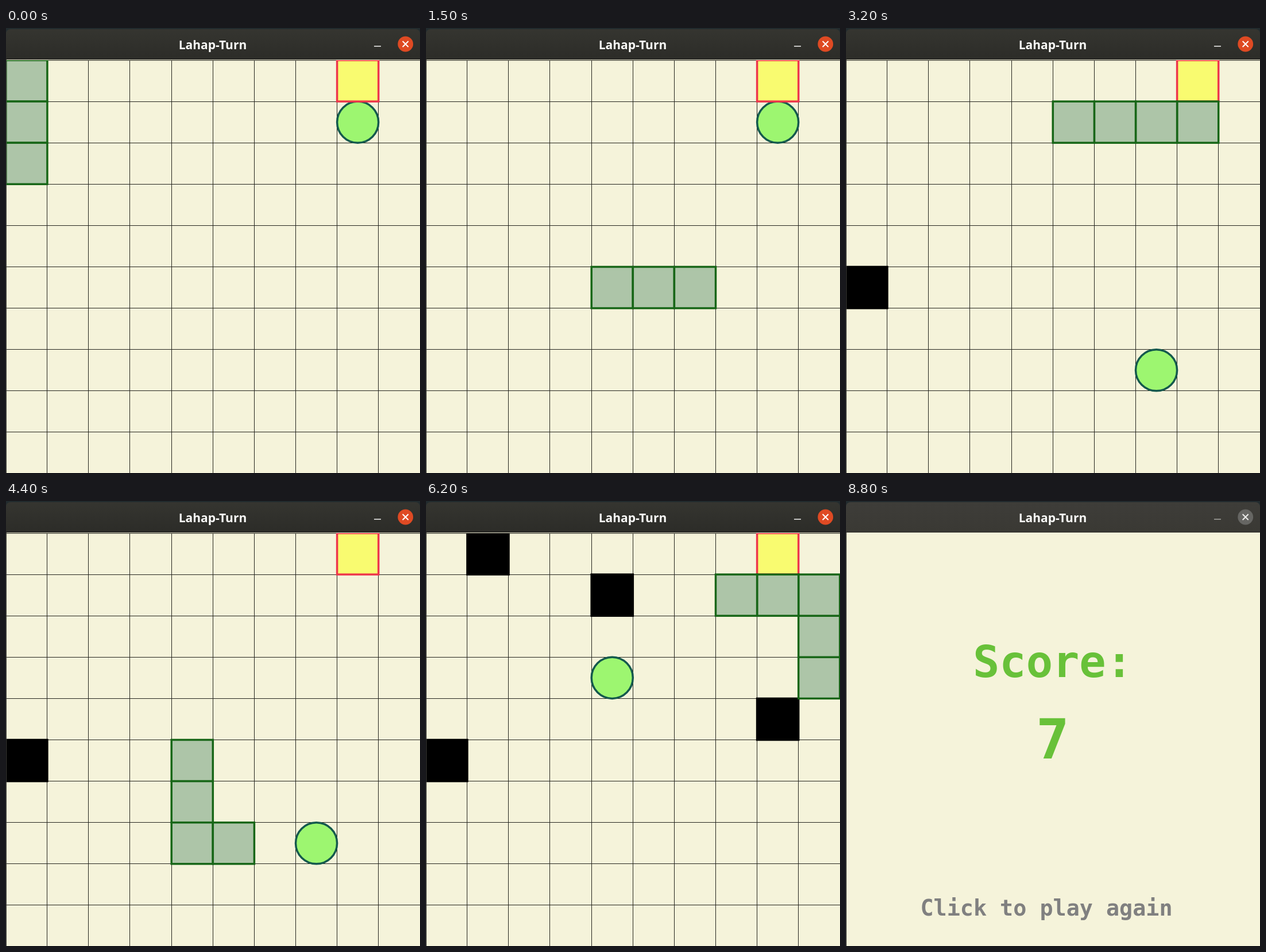
An HTML page with a canvas for the animation above (8900 ms loop, 721 px wide and 776 px high).

```html
<!DOCTYPE html>
<html lang="en">
<head>
<meta charset="utf-8">
<title>Lahap-Turn</title>
<style>
html, body { margin: 0; width: 100%; height: 100%; overflow: hidden; background: #f5f3da; }
canvas { display: block; }
</style>
</head>
<body>
<canvas id="stage" width="721" height="776"></canvas>
<script>
const ctx = document.getElementById('stage').getContext('2d');
const W = 721, H = 776, TOP = 56, CELL = 72.1, EDGE = 3.5;
const LOOP = 8900, GAME_OVER = 6800, BLUR = 8800;
const MONO = '"DejaVu Sans Mono", monospace';

// One letter per move, and the tenth of a second at which it shows.
const MOVES = 'DDDRRRRRRRRRUUUULLLLLDDDDDDRRRRRUUUUUULLLL';
const TICKS = [3, 4, 6, 7, 9, 12, 12, 13, 15, 16, 18, 19, 21, 22, 24, 27, 27, 30, 32, 32, 33,
  35, 36, 38, 39, 41, 42, 44, 47, 47, 48, 50, 51, 53, 55, 56, 58, 59, 62, 62, 64, 67];
const DIRS = { U: [0, -1], D: [0, 1], L: [-1, 0], R: [1, 0] };
const FOODS = [[8, 1], [7, 7], [9, 1], [7, 1], [4, 3]];
const BLOCKS = [[0, 5], [1, 0], [8, 4], [4, 1]];
const BONUS = [8, 0];

const same = (a, b) => a[0] === b[0] && a[1] === b[1];
const px = col => col * CELL - 0.2;
const py = row => TOP + row * CELL;

// The snake grows when its tail leaves a cell where food was eaten.
function play(time) {
  const snake = [[0, 0], [0, 1], [0, 2]];
  let eaten = 0, grown = 0;
  for (let i = 0; i < MOVES.length && TICKS[i] * 100 <= time; i++) {
    const [dx, dy] = DIRS[MOVES[i]];
    const [x, y] = snake[snake.length - 1];
    const head = [x + dx, y + dy];
    if (grown < eaten && same(snake[0], FOODS[grown])) grown++;
    else snake.shift();
    snake.push(head);
    if (same(head, FOODS[eaten])) eaten++;
  }
  return { snake, eaten };
}

function square([c, r], fill, line) {
  ctx.fillStyle = fill;
  ctx.strokeStyle = line;
  ctx.lineWidth = EDGE;
  ctx.fillRect(px(c), py(r), CELL, CELL);
  ctx.strokeRect(px(c), py(r), CELL, CELL);
}

function disc(x, y, radius, fill) {
  ctx.beginPath();
  ctx.arc(x, y, radius, 0, Math.PI * 2);
  ctx.fillStyle = fill;
  ctx.fill();
}

function text(str, x, y, font, fill) {
  ctx.font = font;
  ctx.fillStyle = fill;
  ctx.textAlign = 'center';
  ctx.fillText(str, x, y);
}

function drawGrid() {
  ctx.fillStyle = '#25251f';
  for (let i = 0; i < 10; i++) {
    ctx.fillRect(Math.floor(px(i) - 0.15), TOP, 1, H - TOP);
    ctx.fillRect(0, Math.floor(py(i)), W, 1);
  }
}

function drawGame(time) {
  const { snake, eaten } = play(time);
  drawGrid();
  const [fx, fy] = FOODS[eaten];
  disc(px(fx + 0.5), py(fy + 0.5), CELL / 2, '#9df670');
  ctx.strokeStyle = '#14594d';
  ctx.lineWidth = EDGE;
  ctx.stroke();
  square(BONUS, '#f9fb70', '#ee364b');
  BLOCKS.slice(0, eaten).forEach(b => square(b, '#000', '#000'));
  snake.forEach(s => square(s, '#adc5a8', '#176617'));
}

function drawScore() {
  const green = '#68c139';
  text('Score:', 360, 307, 'bold 77px ' + MONO, green);
  text('7', 360, 449, 'bold 96px ' + MONO, green);
  text('Click to play again', 349, 723, 'bold 38.4px ' + MONO, '#808080');
}

function drawBar(active) {
  ctx.fillStyle = '#222b2e';
  ctx.fillRect(0, 0, W, TOP - 1);
  const shade = ctx.createLinearGradient(0, 2, 0, 54);
  shade.addColorStop(0, active ? '#353530' : '#3e3d39');
  shade.addColorStop(1, active ? '#2c2c28' : '#3a3934');
  ctx.beginPath();
  ctx.roundRect(0, 2, W, 60, 8);
  ctx.save();
  ctx.clip();
  ctx.fillStyle = shade;
  ctx.fillRect(0, 2, W, 52);
  ctx.restore();
  ctx.fillStyle = active ? '#1c1c19' : '#2f2f2b';
  ctx.fillRect(0, 54, W, 1);
  text('Lahap-Turn', 360, 37, 'bold 21px "Noto Sans", "Open Sans", sans-serif', '#fbfbf9');

  ctx.fillStyle = active ? '#f4f4f2' : '#a5a5a0';
  ctx.fillRect(641, 31, 12, 1.5);
  disc(695.7, 28, 13.4, active ? '#df4a23' : '#666663');
  ctx.strokeStyle = active ? '#fff' : '#ececea';
  ctx.lineWidth = 2;
  ctx.beginPath();
  ctx.moveTo(690.7, 23);
  ctx.lineTo(700.7, 33);
  ctx.moveTo(700.7, 23);
  ctx.lineTo(690.7, 33);
  ctx.stroke();
}

function draw(time) {
  ctx.fillStyle = '#f5f3da';
  ctx.fillRect(0, 0, W, H);
  ctx.save();
  ctx.beginPath();
  ctx.rect(1, TOP, W - 1, H - TOP);
  ctx.clip();
  if (time < GAME_OVER) drawGame(time);
  else drawScore();
  ctx.restore();
  ctx.fillStyle = '#3c3c37';
  ctx.fillRect(0, TOP - 1, 1, H);
  drawBar(time < BLUR);
}

const start = performance.now();
function frame() {
  draw((performance.now() - start) % LOOP);
  requestAnimationFrame(frame);
}
frame();
</script>
</body>
</html>
```
